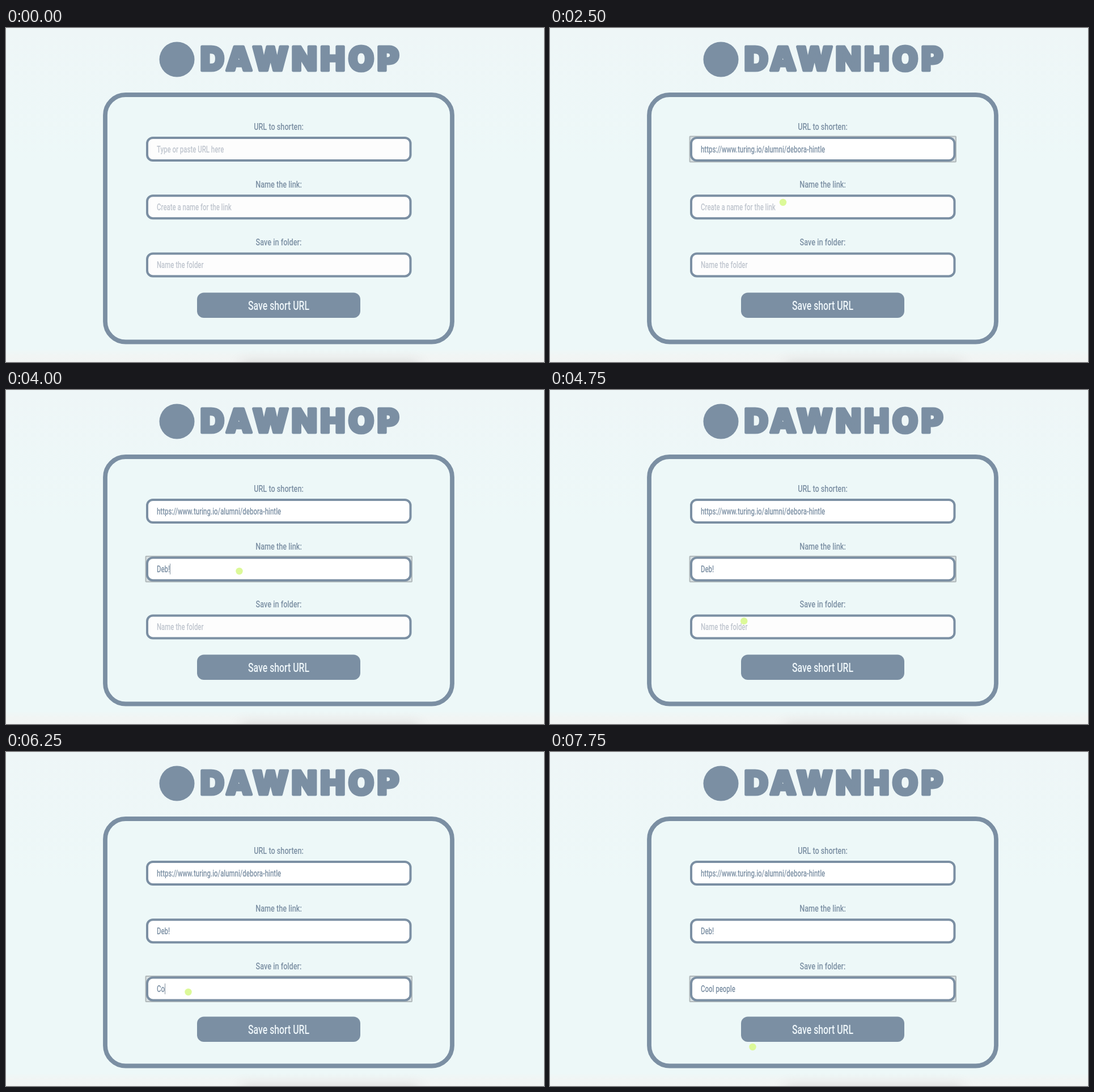
These frames come from a looping animation (949 px wide and 590 px high, 8 s). An HTML page with a canvas:

```html
<!DOCTYPE html>
<html lang="en">
<head>
<meta charset="utf-8">
<title>Link shortener form</title>
<style>
  html, body { margin: 0; width: 100%; height: 100%; overflow: hidden; background: #edf7f8; }
  canvas { display: block; }
</style>
</head>
<body>
<canvas id="stage" width="949" height="590"></canvas>
<script>
const ctx = document.getElementById("stage").getContext("2d");
const LOOP = 8000, STEP = 250, MOVE = 750;
const SLATE = "#7b8fa3", PAPER = "#edf8f8", HINT = "#bfc5ce", LIME = "#dcf998";
const NARROW = 0.729; // one condensed cut for all form text
const MIDDLE = 481;

// rate is in characters per second; the first value is pasted
const fields = [
  { label: "URL to shorten:", hint: "Type or paste URL here",
    value: "https://www.turing.io/alumni/debora-hintle", typeAt: 1250, rate: 400 },
  { label: "Name the link:", hint: "Create a name for the link",
    value: "Deb!", typeAt: 3250, rate: 8 },
  { label: "Save in folder:", hint: "Name the folder",
    value: "Cool people", typeAt: 6000, rate: 8 }
];
const focusTime = i => 1000 + 2000 * i;

// places the pointer reaches, with arrival times
const stops = [
  { at: 250, x: 569, y: 121 },
  { at: 1000, x: 501, y: 229 },
  { at: 2500, x: 411, y: 308 },
  { at: 2750, x: 411, y: 336 },
  { at: 3750, x: 411.5, y: 320 },
  { at: 5000, x: 318, y: 439 },
  { at: 6250, x: 321.5, y: 424 },
  { at: 7750, x: 357.5, y: 521 }
];

const ease = k => k * k * (3 - 2 * k);
const mix = (a, b, k) => a + (b - a) * k;

function pointerAt(t) {
  const next = stops.findIndex(stop => stop.at >= t);
  if (next < 0) return stops[stops.length - 1];
  const to = stops[next], from = stops[Math.max(0, next - 1)];
  const span = Math.min(MOVE, to.at - from.at) || 1;
  const k = ease(Math.max(0, 1 - (to.at - t) / span));
  return { x: mix(from.x, to.x, k), y: mix(from.y, to.y, k) };
}

function box(x, y, w, h, r, fill, stroke, line) {
  ctx.beginPath();
  ctx.roundRect(x, y, w, h, r);
  if (fill) { ctx.fillStyle = fill; ctx.fill(); }
  if (stroke) { ctx.strokeStyle = stroke; ctx.lineWidth = line; ctx.stroke(); }
}

function circle(x, y, r) {
  ctx.beginPath();
  ctx.arc(x, y, r, 0, Math.PI * 2);
}

function disc(x, y, r, color) {
  circle(x, y, r);
  ctx.fillStyle = color;
  ctx.fill();
}

function text(str, x, y, size, color, align = "left") {
  ctx.save();
  ctx.translate(x, y);
  ctx.scale(NARROW, 1);
  ctx.font = `500 ${size}px Roboto, sans-serif`;
  ctx.textAlign = align;
  ctx.fillStyle = color;
  ctx.fillText(str, 0, 0);
  const width = ctx.measureText(str).width * NARROW;
  ctx.restore();
  return width;
}

function drawBackdrop() {
  const sky = ctx.createLinearGradient(0, 0, 0, 590);
  sky.addColorStop(0, "#eef6f7");
  sky.addColorStop(0.4, PAPER);
  sky.addColorStop(0.96, PAPER);
  sky.addColorStop(0.98, "#f1f5f4");
  sky.addColorStop(1, "#f2f4f3");
  ctx.fillStyle = sky;
  ctx.fillRect(0, 0, 949, 590);

  ctx.save();
  ctx.shadowColor = "rgba(150, 145, 145, 0.3)";
  ctx.shadowBlur = 22;
  ctx.fillStyle = "#e8eae9";
  ctx.fillRect(415, 590, 312, 20);
  ctx.restore();
}

function drawBrand() {
  disc(301.5, 55.5, 31, SLATE);
  ctx.save();
  ctx.font = "900 58px Inter, sans-serif";
  ctx.letterSpacing = "6px";
  ctx.textAlign = "center";
  ctx.lineJoin = "round";
  ctx.lineWidth = 5;
  ctx.fillStyle = ctx.strokeStyle = SLATE;
  ctx.fillText("DAWNHOP", 521, 74.5);
  ctx.strokeText("DAWNHOP", 521, 74.5);
  ctx.restore();
}

function drawField(field, i, t) {
  const y = 192 + 102.2 * i;
  const focused = t >= focusTime(i) && (t < focusTime(i + 1) || i === fields.length - 1);
  const count = Math.max(0, Math.floor((t - field.typeAt) / 1000 * field.rate));
  const typed = field.value.slice(0, count);

  text(field.label, MIDDLE, y - 12.5, 17.4, SLATE, "center");
  if (focused) {
    box(246.5, y - 0.5, 469.5, 45, 1, "#d9e1e3", "#b1b9bb", 2);
  }
  box(249, y + 2, 464.5, 40, 10, typed || focused ? "#ffffff" : "#fdfdfd", SLATE, 4);

  const width = text(typed || field.hint, 266, y + 28, 15.7, typed ? SLATE : HINT);
  if (focused && t % 1000 < 500) {
    ctx.fillStyle = "#8593a1";
    ctx.fillRect(266 + (typed ? Math.round(width) : 0), y + 12.5, 1, 19);
  }
}

// A click shows a brief ring and hides the pointer for a moment.
function drawPointer(t) {
  const { x, y } = pointerAt(t);
  const sinceClick = Math.min(...fields.map((_, i) => t - focusTime(i) - STEP).filter(d => d >= 0));
  if (sinceClick < STEP) {
    circle(x, y, 7.5);
    ctx.strokeStyle = "rgba(226, 236, 170, 0.6)";
    ctx.lineWidth = 1;
    ctx.stroke();
  } else if (t >= stops[0].at && sinceClick >= 2 * STEP) {
    disc(x, y, 6.2, LIME);
  }
}

function draw(elapsed) {
  const t = Math.floor((elapsed % LOOP) / STEP) * STEP;
  drawBackdrop();
  drawBrand();
  box(175, 118, 612, 436.5, 36, PAPER, SLATE, 7.8);
  fields.forEach((field, i) => drawField(field, i, t));
  box(337, 467.5, 288, 44.5, 12, SLATE);
  text("Save short URL", MIDDLE, 498, 21.7, "#eef6fa", "center");
  drawPointer(t);
}

const start = performance.now();
function tick() {
  draw(performance.now() - start);
  requestAnimationFrame(tick);
}
tick();
</script>
</body>
</html>
```
